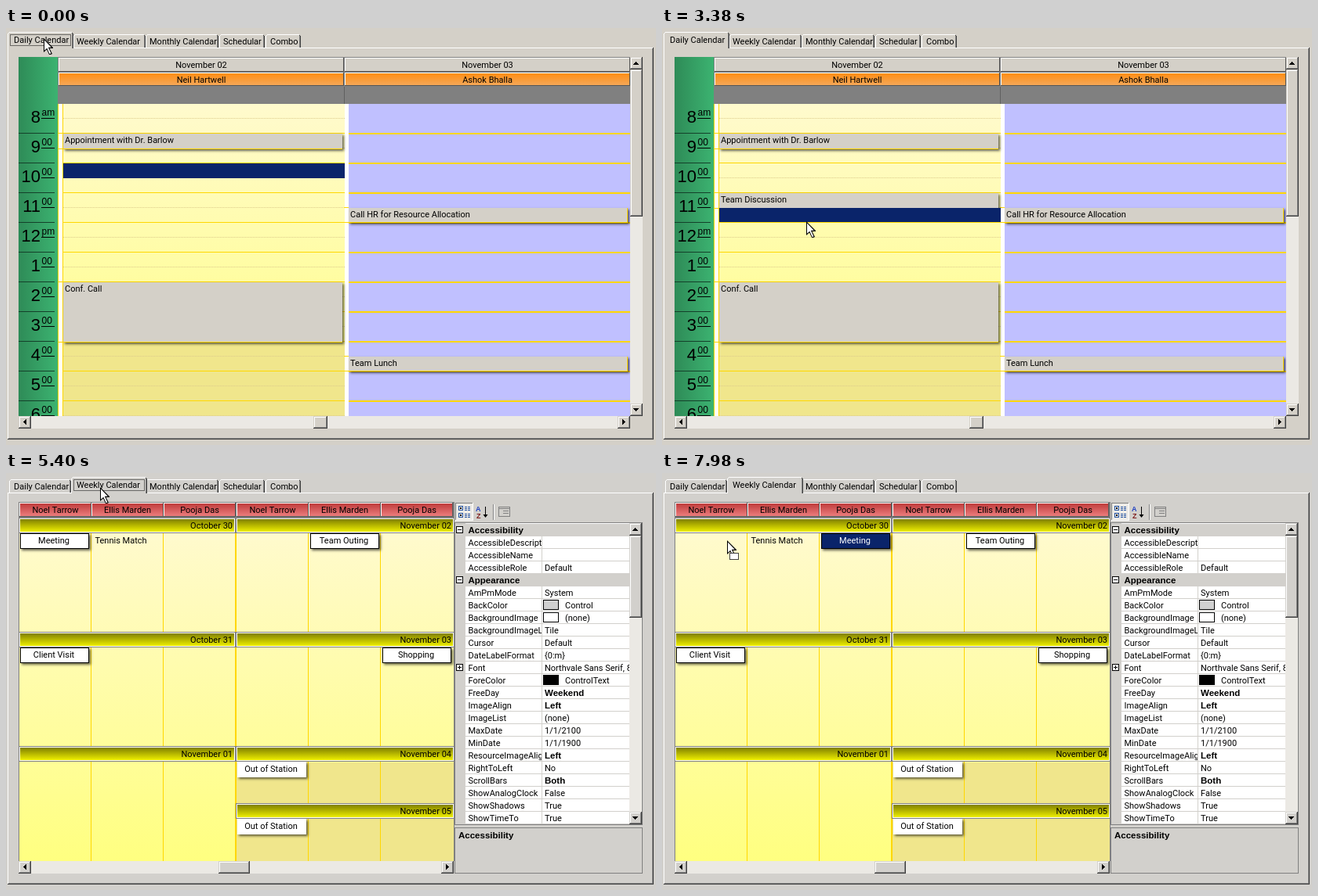
Recreate the animation shown at these times as an HTML page with a canvas. Size 829 by 533 pixels, loop 8000 ms.

```html
<!DOCTYPE html>
<html lang="en">
<head>
<meta charset="utf-8">
<title>Calendar demo</title>
<style>
html, body { margin: 0; width: 100%; height: 100%; overflow: hidden; background: #d4d0c8; }
canvas { display: block; }
</style>
</head>
<body>
<canvas id="stage" width="829" height="533"></canvas>
<script>
const g = document.getElementById('stage').getContext('2d');
const LOOP = 8000, STEP = 60;
const GRAY = '#808080', DARK = '#404040', GOLD = '#ffd700', NAVY = '#0a246a', KHAKI = '#f0e68c';
let face;

// Drawing helpers
function box(x, y, w, h, fill) {
  g.fillStyle = fill;
  g.fillRect(x, y, w, h);
}
function frame(x, y, w, h, topLeft, bottomRight = topLeft) {
  box(x, y, w, 1, topLeft);
  box(x, y, 1, h, topLeft);
  box(x, y + h - 1, w, 1, bottomRight);
  box(x + w - 1, y, 1, h, bottomRight);
}
function fade(x0, y0, x1, y1, from, to) {
  const grad = g.createLinearGradient(x0, y0, x1, y1);
  grad.addColorStop(0, from);
  grad.addColorStop(1, to);
  return grad;
}
function text(str, x, y, { align = 'left', font = '11px Roboto, sans-serif', color = '#000' } = {}) {
  g.font = font;
  g.textAlign = align;
  g.fillStyle = color;
  g.fillText(str, x, y);
}
const sans = (size, weight = '') => `${weight} ${size}px "Liberation Sans", Arial, sans-serif`;
const BOLD = sans(11.5, 'bold');

function clipped(x, y, w, h, draw) {
  g.save();
  g.beginPath();
  g.rect(x, y, w, h);
  g.clip();
  draw();
  g.restore();
}
function poly(points, fill) {
  g.beginPath();
  points.forEach(([x, y]) => g.lineTo(x, y));
  g.closePath();
  g.fillStyle = fill;
  g.fill();
}
function dots(x, y, w, h, color) {
  g.save();
  g.strokeStyle = color;
  g.setLineDash([1, 1]);
  g.beginPath();
  if (h) g.rect(x + .5, y + .5, w - 1, h - 1);
  else { g.moveTo(x, y + .5); g.lineTo(x + w, y + .5); }
  g.stroke();
  g.restore();
}
function raised(x, y, w, h, fill) {
  g.save();
  g.shadowColor = 'rgba(0,0,0,.6)';
  g.shadowOffsetX = g.shadowOffsetY = 2;
  g.shadowBlur = 3;
  box(x, y, w, h, fill);
  g.restore();
}

// Window controls
function button(x, y, w, h) {
  box(x, y, w, h, face);
  frame(x, y, w, h, face, DARK);
  frame(x + 1, y + 1, w - 2, h - 2, '#fff', GRAY);
}
function arrowButton(x, y, dx, dy) {
  button(x, y, 16, 16);
  for (let i = 0; i < 4; i++) {
    if (dx) box(x + 7 + dx * (1 - i) + (dx > 0 ? 1 : 0), y + 7 - i, 1, 2 * i + 1, '#000');
    else box(x + 7 - i, y + 7 + dy * (1 - i) + (dy > 0 ? 1 : 0), 2 * i + 1, 1, '#000');
  }
}
function vScroll(x, y, h, thumbY, thumbH) {
  box(x, y, 16, h, '#ebe9e4');
  arrowButton(x, y, 0, -1);
  arrowButton(x, y + h - 16, 0, 1);
  button(x, thumbY, 16, thumbH);
}
function hScroll(x, y, w, thumbX, thumbW) {
  box(x, y, w, 16, '#ebe9e4');
  arrowButton(x, y, -1, 0);
  arrowButton(x + w - 16, y, 1, 0);
  button(thumbX, y, thumbW, 16);
}

const TABS = [
  ['Daily Calendar', 4, 83, 10], ['Weekly Calendar', 86, 178, 90], ['Monthly Calendar', 178, 271, 183],
  ['Schedular', 272, 330, 277], ['Combo', 331, 376, 337]
];
function drawTab(i, selected, focus) {
  let [label, x0, x1, tx] = TABS[i];
  let y = 8;
  if (selected) {
    x0 = i ? x0 - 3 : 2;
    x1 = i ? 180 : 86;
    y = 5;
  }
  const h = 25 - y + (selected ? 1 : 0);
  box(x0, y, x1 - x0, h, face);
  box(x0, y + 2, 1, h - 2, '#fff');
  box(x0 + 1, y + 1, 1, 1, '#fff');
  box(x0 + 2, y, x1 - x0 - 4, 1, '#fff');
  box(x1 - 2, y + 2, 1, h - 2, GRAY);
  box(x1 - 1, y + 2, 1, h - 2, DARK);
  box(x1 - 2, y + 1, 1, 1, DARK);
  text(label, tx, selected ? 19 : 21);
  if (focus) dots(x0 + 3, 8, x1 - x0 - 6, 15, '#000');
}
function drawTabs(active, focus) {
  box(0, 0, 829, 533, face);
  frame(2, 25, 824, 501, '#fff', DARK);
  frame(3, 26, 822, 499, face, GRAY);
  TABS.forEach((tab, i) => i !== active && drawTab(i, false));
  drawTab(active, true, focus);
}

function header(x, y, w, h, fill, label) {
  box(x, y, w, h, fill);
  frame(x, y, w, h, '#fff', '#555');
  text(label, x + w / 2, y + 13, { align: 'center' });
}

// Daily page
function dayEvent(x, y, h, label, selected) {
  box(x - 6, y - 1, 6, 1, GOLD);
  box(x - 6, y + h - 1, 6, 1, GOLD);
  raised(x, y, 356, h, selected ? NAVY : face);
  box(x, y + h - 1, 356, 1, GOLD);
  if (x > 400) box(x + 355, y, 1, h, GOLD);
  text(label, x + 2, y + 12, { color: selected ? '#fff' : '#000' });
}

function drawDaily(t) {
  const editing = t >= 560 && t < 2140, created = t >= 2140, moved = t >= 3380;
  drawTabs(0, !created);
  box(16, 37, 780, 459, GRAY);
  box(16, 37, 50, 459, fade(16, 0, 66, 0, '#2e8b57', '#3cb371'));
  [['November 02', 'Neil Hartwell'], ['November 03', 'Ashok Bhalla']].forEach(([day, person], i) => {
    const x = i ? 432 : 67;
    header(x, 38, 364, 18, face, day);
    header(x, 57, 364, 17, fade(0, 57, 0, 74, '#ff8c10', '#f4a95c'), person);
  });
  box(431, 75, 1, 22, '#606060');

  clipped(16, 97, 780, 399, () => {
    box(66, 97, 366, 399, '#fff');
    box(432, 97, 364, 399, '#fff');
    box(73, 97, 359, 304, fade(0, 97, 0, 496, '#fffacd', '#ffff80'));
    box(73, 401, 359, 95, KHAKI);
    box(437, 97, 359, 399, '#c0c0ff');
    box(66, 97, 1, 399, GOLD);
    box(72, 97, 1, 399, GOLD);
    for (let i = 0; i < 11; i++) {
      const y = 97 + 38 * i;
      dots(73, y + 18, 359, 0, '#dccb8c');
      box(73, y + 37, 359, 1, GOLD);
      box(437, y + 37, 359, 2, GOLD);
      box(16, y + 37, 46, 1, '#14402a');
      text((i + 7) % 12 + 1, 44, y + 24, { align: 'right', font: sans(22) });
      text(i === 0 ? 'am' : i === 4 ? 'pm' : '00', 45.5, y + 15, { font: sans(12) });
      box(45, y + 18, 17, 1, '#000');
    }
    dayEvent(73, 135, 20, 'Appointment with Dr. Barlow');
    dayEvent(73, 325, 77, 'Conf. Call');
    dayEvent(437, 230, 19, 'Call HR for Resource Allocation');
    dayEvent(437, 420, 19, 'Team Lunch');
    if (!created) box(73, 173, 359, 19, NAVY);
    if (editing) {
      box(73, 211, 354, 18, face);
      text('Team Discussion', 74, 222);
      box(154, 212, 1, 12, '#000');
    }
    if (created) dayEvent(73, 211, 20, 'Team Discussion', !moved);
    if (moved) box(73, 230, 359, 18, NAVY);
  });
  vScroll(796, 37, 459, 53, 188);
  hScroll(16, 496, 780, 392, 18);
}

// Weekly page
function weekEvent(x, y, label, { fill = '#fff', border = '#000', color = '#000' } = {}) {
  raised(x, y, 88, 20, fill);
  frame(x, y, 88, 20, border);
  text(label, x + 43, y + 13, { align: 'center', color });
}

function drawWeek(dropped) {
  box(16, 37, 556, 459, GRAY);
  box(17, 77, 554, 419, fade(0, 77, 0, 496, '#fffacd', '#ffff80'));
  box(294, 370, 277, 126, KHAKI);
  for (const left of [17, 294]) {
    ['Noel Tarrow', 'Ellis Marden', 'Pooja Das'].forEach((person, i) => {
      const x = left + 92 * i;
      header(x, 38, 92, 18, fade(0, 38, 0, 56, '#bd3838', '#ee8080'), person);
      if (i) box(x - 1, 77, 1, 419, GOLD);
    });
  }
  box(292, 77, 2, 419, GOLD);
  [['October 30', 17, 57], ['November 02', 294, 57], ['October 31', 17, 203], ['November 03', 294, 203],
    ['November 01', 17, 349], ['November 04', 294, 349], ['November 05', 294, 422]].forEach(([day, x, y]) => {
    const w = x < 100 ? 275 : 277;
    box(x - 1, y, w + 2, 20, GRAY);
    box(x, y + 1, w, 18, '#fff');
    box(x + 1, y + 2, w - 2, 16, fade(0, y + 2, 0, y + 18, '#808000', '#eeee00'));
    text(day, x + w - 3, y + 14, { align: 'right' });
  });
  if (dropped) weekEvent(203, 77, 'Meeting', { fill: NAVY, color: '#fff' });
  else weekEvent(18, 77, 'Meeting');
  text('Tennis Match', 113.5, 90);
  weekEvent(388, 77, 'Team Outing');
  weekEvent(18, 223, 'Client Visit');
  weekEvent(480, 223, 'Shopping');
  weekEvent(295, 369, 'Out of Station', { border: '#fff' });
  weekEvent(295, 442, 'Out of Station', { border: '#fff' });
  hScroll(16, 496, 555, 271, 40);
}

// A leading # marks a category, * a bold value, + an expandable row
const PROPS = `#Accessibility
AccessibleDescripti|
AccessibleName|
AccessibleRole|Default
#Appearance
AmPmMode|System
BackColor|Control
BackgroundImage|(none)
BackgroundImageL|Tile
Cursor|Default
DateLabelFormat|{0:m}
+Font|Northvale Sans Serif, 8.
ForeColor|ControlText
FreeDay|*Weekend
ImageAlign|*Left
ImageList|(none)
MaxDate|1/1/2100
MinDate|1/1/1900
ResourceImageAlig|*Left
RightToLeft|No
ScrollBars|*Both
ShowAnalogClock|False
ShowShadows|True
ShowTimeTo|True`.split('\n');
const SWATCH = { BackColor: '#d0d0d0', BackgroundImage: '#fff', ForeColor: '#000' };

function expander(x, y, plus) {
  box(x, y, 9, 9, '#fff');
  frame(x, y, 9, 9, '#000');
  box(x + 2, y + 4, 5, 1, '#000');
  if (plus) box(x + 4, y + 2, 1, 5, '#000');
}

function drawToolbar() {
  box(573, 38, 23, 23, '#eceae6');
  frame(573, 38, 23, 23, GRAY, '#fff');
  for (const y of [42, 51]) {
    frame(577, y, 6, 6, '#2050a0');
    box(579, y + 2, 2, 2, '#000');
    for (let i = 0; i < 3; i++) {
      box(585, y + 1 + 2 * i, 3, 1, '#2050a0');
      box(589, y + 1 + 2 * i, 3, 1, '#2050a0');
    }
  }
  text('A', 599, 49, { font: sans(9, 'bold'), color: '#2040c0' });
  text('Z', 600, 58, { font: sans(9, 'bold'), color: '#802020' });
  box(611, 43, 1, 13, '#000');
  poly([[608.5, 53], [614.5, 53], [611.5, 57]], '#000');
  box(621, 40, 1, 20, GRAY);
  box(622, 40, 1, 20, '#fff');
  frame(628, 43, 15, 13, GRAY);
  box(629, 45, 13, 1, GRAY);
  for (const y of [48, 51]) box(634, y, 7, 1, GRAY);
}

function drawProps() {
  drawToolbar();
  box(572, 63, 240, 387, '#fff');
  frame(572, 63, 240, 387, GRAY);
  clipped(573, 64, 222, 385, () => {
    box(573, 64, 13, 385, face);
    PROPS.forEach((row, i) => {
      const y = 65 + 16 * i;
      if (row[0] === '#') {
        box(573, y, 222, 16, face);
        expander(574, y + 3);
        text(row.slice(1), 589.5, y + 12, { font: BOLD });
        return;
      }
      if (row[0] === '+') expander(574, y + 3, true);
      const [name, value] = row.replace('+', '').split('|');
      const swatch = SWATCH[name];
      box(586, y + 15, 209, 1, face);
      box(683, y, 1, 16, face);
      clipped(586, y, 97, 16, () => text(name, 589.5, y + 12));
      if (swatch) {
        box(685, y + 1, 20, 13, swatch);
        frame(685, y + 1, 20, 13, '#000');
      }
      if (value[0] === '*') text(value.slice(1), 687, y + 12, { font: BOLD });
      else text(value, swatch ? 713 : 687, y + 12);
    });
  });
  vScroll(795, 64, 385, 80, 105);
  frame(572, 453, 240, 59, GRAY);
  text('Accessibility', 577, 467, { font: BOLD });
}

// Mouse: start time, number of steps, end point of each glide
const GLIDES = [
  [1060, 8, 132, 98], [1540, 10, 218, 220], [2640, 2, 205, 230], [3260, 2, 184, 247],
  [3880, 14, 132, 45], [4720, 2, 120, 18], [5900, 9, 210, 105], [6940, 4, 152, 103], [7680, 5, 83, 86]
];
function mouseAt(t) {
  let x = 48, y = 13;
  for (const [start, steps, toX, toY] of GLIDES) {
    if (t < start) break;
    const k = Math.min(1, (Math.floor((t - start) / STEP) + 1) / steps);
    x += (toX - x) * k;
    y += (toY - y) * k;
  }
  return [Math.round(x), Math.round(y)];
}
function drawMouse(t) {
  const [x, y] = mouseAt(t);
  g.save();
  g.translate(x, y);
  poly([[0, 0], [12, 12], [12, 13], [7.5, 13], [11, 20], [9, 21], [7, 21], [4, 14.5], [0, 18]], '#000');
  poly([[1, 2.4], [9.8, 11.8], [5.8, 11.8], [9.5, 19.5], [7.5, 20], [4.3, 12.8], [1, 15.8]], '#fff');
  if (t >= 6940) {
    box(3, 16, 12, 9, '#fff');
    frame(3, 16, 12, 9, GRAY);
    dots(3, 16, 12, 9, '#000');
  }
  g.restore();
}

function draw() {
  const t = performance.now() % LOOP;
  const daily = t < 5400;
  face = daily ? '#d4d0c8' : '#d2d0cc';
  if (daily) drawDaily(t);
  else {
    drawTabs(1, t < 7180);
    drawWeek(t >= 7180);
    drawProps();
  }
  drawMouse(t);
  requestAnimationFrame(draw);
}
draw();
</script>
</body>
</html>
```
